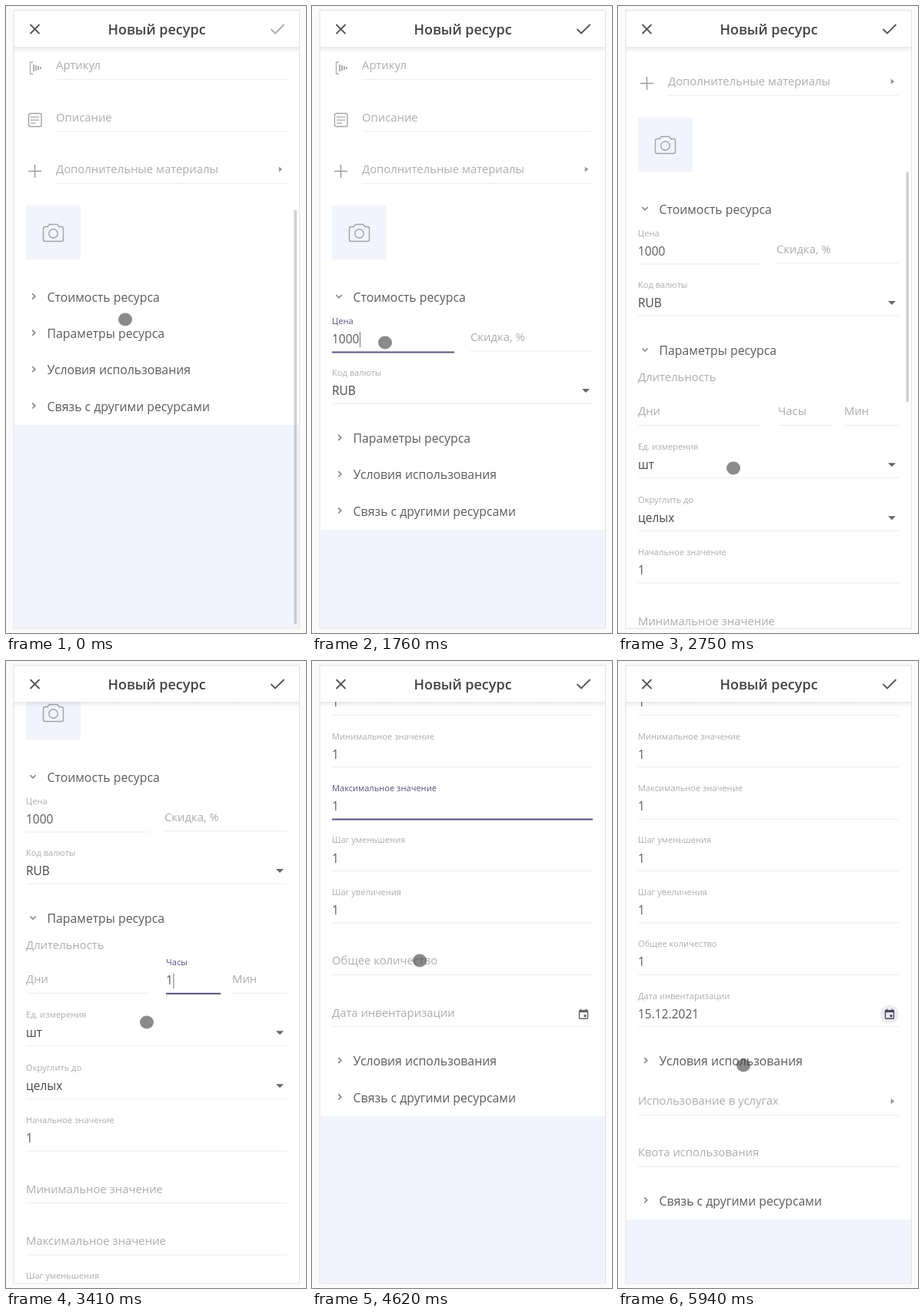
These frames come from a looping animation (390x814 px, 6.05 s). An HTML page with a canvas:

```html
<!DOCTYPE html>
<html lang="ru">
<head>
<meta charset="utf-8">
<title>Новый ресурс</title>
<style>
  html, body { margin: 0; width: 100%; height: 100%; overflow: hidden; background: #fbfbfb; }
  canvas { display: block; }
</style>
</head>
<body>
<canvas id="stage" width="390" height="814"></canvas>
<script>
const ctx = document.getElementById('stage').getContext('2d');
const LOOP = 6050, STEP = 110, MOVE = 220, BLINK = 250;
const TITLE = 18, HEADING = 15.8, BODY = 14.85, VALUE = 15.5, LABEL = 11.1;
const INK = '#5b5b5b', DARK = '#484848', FAINT = '#adadad', LINE = '#ebebeb';
const ACCENT = '#59527f', BLUE = '#f1f4fd', ICON = '#a4a4a8';
let now = 0;

// What the finger does: a drag scrolls the page, a tap opens a panel or enters a field.
const stops = [
  { at: -110, x: 155, y: 407, drag: 0 },
  { at: 220, x: 125, y: 380 },
  { at: 440, x: 125, y: 380, opens: 'Стоимость ресурса' },
  { at: 770, x: 95, y: 437, field: 'Цена', text: '1000', delay: 550 },
  { at: 1980, x: 103, y: 561, drag: 114 },
  { at: 2420, x: 103, y: 447, opens: 'Параметры ресурса' },
  { at: 2750, x: 150, y: 600, drag: 113 },
  { at: 3190, x: 238, y: 414, field: 'Часы', text: '1' },
  { at: 3520, x: 128, y: 524, drag: 226 },
  { at: 3850, x: 119, y: 460, field: 'Минимальное значение', text: '1' },
  { at: 4125, x: 119, y: 526, field: 'Максимальное значение', text: '1' },
  { at: 4290, x: 150, y: 700, drag: 340 },
  { at: 4620, x: 140, y: 389, field: 'Общее количество', text: '1' },
  { at: 5170, x: 362, y: 459, picker: 'open' },
  { at: 5500, x: 134, y: 325, picker: 'close' },
  { at: 5720, x: 163, y: 525, opens: 'Условия использования' }
];
const drags = stops.filter(s => 'drag' in s);
const taps = stops.filter(s => s.field || s.opens || s.picker);
const pickerTime = state => stops.find(s => s.picker === state).at + STEP;

const clamp = v => Math.min(1, Math.max(0, v));
const ease = v => { const s = clamp(v); return s * s * (3 - 2 * s); };
const mix = (a, b, s) => a + (b - a) * s;
const dragged = s => (s.drag || 0) * ease((now - s.at) / MOVE);
const scrolled = () => Math.round(drags.reduce((sum, s) => sum + dragged(s), 0));

// The finger rests at each stop and leaves just in time for the next one.
function pointerPosition() {
  const i = stops.findLastIndex(s => s.at <= now);
  const here = stops[i], next = stops[i + 1] || here;
  const leave = Math.max(here.at + ('drag' in here ? MOVE : 0), next.at - MOVE);
  const s = next === here ? 0 : ease((now - leave) / (next.at - leave));
  return [mix(here.x, next.x, s), mix(here.y - dragged(here), next.y, s)];
}

function barOpacity() {
  return Math.max(...drags.map(s =>
    Math.min(clamp((now - s.at) / STEP + 1), clamp((s.at + MOVE + 60 - now) / 170))));
}

function panelProgress(title) {
  const tap = taps.find(s => s.opens === title);
  const age = tap ? now - tap.at : 0;
  return { open: ease(age / MOVE), turn: ease((age - MOVE) / STEP) };
}

// Entered text, focus and caret of a field.
function entry(name) {
  const tap = taps.find(s => s.field === name);
  if (!tap) return { value: '' };
  const start = tap.at + (tap.delay || STEP);
  const count = Math.max(0, Math.min(tap.text.length, Math.floor((now - start) / STEP) + 1));
  const focused = taps.findLast(s => s.at < now) === tap;
  const lastKey = count ? start + (count - 1) * STEP : tap.at;
  return {
    value: tap.text.slice(0, count),
    focused,
    caret: focused && (now - lastKey) % (2 * BLINK) < BLINK
  };
}

function text(str, x, y, size, color, weight = 400, align = 'left') {
  ctx.font = `${weight} ${size}px "Open Sans", sans-serif`;
  ctx.fillStyle = color;
  ctx.textAlign = align;
  ctx.fillText(str, x, y + size * 0.36);
}

function rect(x, y, w, h, color) {
  ctx.fillStyle = color;
  ctx.fillRect(x, y, w, h);
}

function path(points, color, width = 1.5) {
  ctx.beginPath();
  points.forEach(([x, y]) => ctx.lineTo(x, y));
  ctx.strokeStyle = color;
  ctx.lineWidth = width;
  ctx.stroke();
}

function outline(x, y, w, h, r, color) {
  ctx.beginPath();
  ctx.roundRect(x, y, w, h, r);
  ctx.strokeStyle = color;
  ctx.lineWidth = 1.4;
  ctx.stroke();
}

function ellipse(x, y, rx, ry, color) {
  ctx.beginPath();
  ctx.ellipse(x, y, rx, ry, 0, 0, 2 * Math.PI);
  ctx.fillStyle = color;
  ctx.fill();
}

function triangle(x, y, angle, half, depth, color) {
  ctx.save();
  ctx.translate(x, y);
  ctx.rotate(angle);
  ctx.beginPath();
  ctx.moveTo(-depth / 2, -half);
  ctx.lineTo(-depth / 2, half);
  ctx.lineTo(depth / 2, 0);
  ctx.fillStyle = color;
  ctx.fill();
  ctx.restore();
}

function chevron(x, y, angle, size, color) {
  ctx.save();
  ctx.translate(x, y);
  ctx.rotate(angle);
  path([[-size / 2, -size], [size / 2, 0], [-size / 2, size]], color, 1.7);
  ctx.restore();
}

const downArrow = (x, y) => triangle(x, y + 0.5, Math.PI / 2, 5, 5, '#686868');
const rightArrow = y => triangle(357, y, 0, 3.5, 4.5, '#969696');

// The label floats once the field has focus or a value.
function field(name, y, { x = 26, right = 365, value, color = INK } = {}) {
  const state = entry(name), shown = value || state.value;
  if (state.focused || shown) {
    text(name, x, y - 23, LABEL, state.focused ? ACCENT : FAINT);
    text(shown, x, y + 0.5, VALUE, color);
  } else {
    text(name, x, y - 1.5, BODY, FAINT);
  }
  rect(x, y + 16.5, right - x, state.focused ? 2 : 1, state.focused ? ACCENT : LINE);
  if (state.caret) rect(x + ctx.measureText(shown).width + 0.5, y - 9, 1, 20, '#777');
}

function select(name, value, y) {
  field(name, y, { value, color: DARK });
  downArrow(356, y);
}

function costBody(y) {
  field('Цена', y + 54, { right: 185 });
  field('Скидка, %', y + 53, { x: 206 });
  select('Код валюты', 'RUB', y + 121);
}

function paramsBody(y) {
  text('Длительность', 26, y + 34, BODY, FAINT);
  field('Дни', y + 80, { right: 185 });
  field('Часы', y + 80, { x: 208, right: 279 });
  field('Мин', y + 80, { x: 294 });
  select('Ед. измерения', 'шт', y + 148);
  select('Округлить до', 'целых', y + 217);

  const preset = { value: '1' };
  const chosen = now >= pickerTime('close');
  const rows = [
    ['Начальное значение', preset], ['Минимальное значение'], ['Максимальное значение'],
    ['Шаг уменьшения', preset], ['Шаг увеличения', preset], ['Общее количество'],
    ['Дата инвентаризации', { value: chosen ? '15.12.2021' : '' }]
  ];
  const rowY = i => y + 285 + 67.4 * i;
  rows.forEach(([name, options], i) => field(name, rowY(i), options));
  calendarIcon(rowY(rows.length - 1), chosen);
}

function usageBody(y) {
  field('Использование в услугах', y + 53);
  rightArrow(y + 52);
  field('Квота использования', y + 120);
}

const panels = [
  { title: 'Стоимость ресурса', height: 136, body: costBody },
  { title: 'Параметры ресурса', height: 704, body: paramsBody },
  { title: 'Условия использования', height: 134, body: usageBody },
  { title: 'Связь с другими ресурсами', height: 0 }
];

// Draws a panel and returns where the next one starts.
function drawPanel({ title, height, body }, y) {
  const { open, turn } = panelProgress(title);
  text(title, 53.5, y, HEADING, INK);
  chevron(36 - turn, y - 1, turn * Math.PI / 2, 3.6, '#898989');
  if (open > 0) {
    ctx.save();
    ctx.beginPath();
    ctx.rect(10, y + 22, 371, height * open);
    ctx.clip();
    body(y);
    ctx.restore();
  }
  return y + 47.3 + height * open;
}

function calendarIcon(y, active) {
  const color = active ? '#4b4763' : '#666';
  if (active) ellipse(353, y + 1, 12, 12, '#ebebf1');
  outline(347.5, y - 4, 11, 10.5, 1, color);
  rect(347, y - 4.5, 12, 3, color);
  for (const dx of [-3.5, 3.5]) rect(352.3 + dx, y - 6, 1.5, 2, color);
  rect(353.5, y + 1.5, 3, 3, color);
}

function mainFields() {
  ['Артикул', 'Описание', 'Дополнительные материалы']
    .forEach((name, i) => field(name, 78.3 + 67.5 * i, { x: 65 }));

  path([[35, 73], [31.5, 73], [31.5, 88], [35, 88]], '#b0b0b0', 1.4);
  for (let i = 0; i < 4; i++) rect(35 + i * 3, 76 + i, 2, 9 - 2 * i, '#b0b0b0');

  outline(29.5, 139.5, 16.5, 17, 2, ICON);
  for (let i = 0; i < 3; i++) rect(32, 143.5 + i * 4, i < 2 ? 11 : 7, 1.2, ICON);

  path([[29, 214.5], [46, 214.5]], '#999');
  path([[37.5, 206], [37.5, 223]], '#999');
  rightArrow(212);

  rect(26, 259, 71, 70, BLUE);
  outline(48.5, 286.5, 26, 19, 2.5, ICON);
  rect(55, 285, 13, 3, BLUE);
  path([[54, 286.5], [56.5, 283.5], [66.5, 283.5], [69, 286.5]], ICON);
  outline(55.7, 289.7, 11.6, 11.6, 5.8, ICON);
}

function content() {
  const scroll = scrolled();
  const opened = panels.reduce((sum, p) => sum + p.height * panelProgress(p.title).open, 0);
  const end = 544 + opened;

  ctx.save();
  ctx.beginPath();
  ctx.rect(11, 53, 370, 754);
  ctx.clip();
  rect(11, 53, 370, 754, BLUE);
  rect(11, 53, 370, end - scroll - 53, '#fff');
  ctx.translate(0, -scroll);
  mainFields();
  panels.reduce((y, panel) => drawPanel(panel, y), 378);
  ctx.translate(0, scroll);

  const ratio = 750 / (end + 503);
  rect(374.5, 53 + (296 + scroll) * ratio, 3.5, 750 * ratio, `rgba(150,150,155,${barOpacity() * 0.45})`);
  ctx.restore();
}

function header() {
  const shade = ctx.createLinearGradient(0, 52, 0, 60);
  shade.addColorStop(0, 'rgba(0,0,0,.1)');
  shade.addColorStop(1, 'rgba(0,0,0,0)');
  rect(10, 52, 371, 8, shade);
  rect(10, 6, 371, 47, '#fff');
  for (const d of [-6, 6]) path([[37.5 - d, 24], [37.5 + d, 36]], '#555', 1.8);
  text('Новый ресурс', 196, 30.5, TITLE, '#444', 600, 'center');
  const ready = panelProgress(panels[0].title).open === 1;
  path([[344.5, 30], [350, 35.5], [361.5, 24]], ready ? '#555' : '#a9a9a9', 1.9);
}

function datePicker() {
  const left = 26, top = 80, cell = 40;
  ctx.save();
  ctx.shadowColor = 'rgba(0,0,0,.25)';
  ctx.shadowBlur = 6;
  ctx.shadowOffsetY = 2;
  rect(left, top, 296, 354, '#fff');
  ctx.restore();

  text('ДЕК. 2021 Г.', left + 24, top + 32, 14, INK, 600);
  downArrow(left + 124, top + 32);
  chevron(left + 228, top + 32, Math.PI, 5, '#777');
  chevron(left + 268, top + 32, 0, 5, '#777');

  const column = i => left + 28 + cell * i;
  [...'ПВСЧПСВ'].forEach((day, i) => text(day, column(i), top + 78, 11, '#999', 400, 'center'));
  rect(left, top + 98, 296, 1, '#e2e2e2');
  text('ДЕК.', left + 18, top + 125, 13, '#777');
  for (let day = 1; day <= 31; day++) {
    const slot = day + 1;
    text(day, column(slot % 7), top + 165 + cell * Math.floor(slot / 7), 13, INK, 400, 'center');
  }
}

function draw(time) {
  now = Math.floor((time % LOOP) / STEP) * STEP;
  rect(0, 0, 390, 814, '#fbfbfb');
  rect(10, 5, 372, 803, '#fff');
  content();
  header();
  ctx.strokeStyle = '#e2e2e4';
  ctx.lineWidth = 1;
  ctx.strokeRect(10, 5.5, 371.5, 802.5);
  if (now >= pickerTime('open') && now < pickerTime('close')) datePicker();
  ellipse(...pointerPosition(), 9, 8.5, 'rgba(60,60,60,.6)');
}

const begin = performance.now();
function tick() {
  draw(performance.now() - begin);
  requestAnimationFrame(tick);
}
tick();
</script>
</body>
</html>
```
